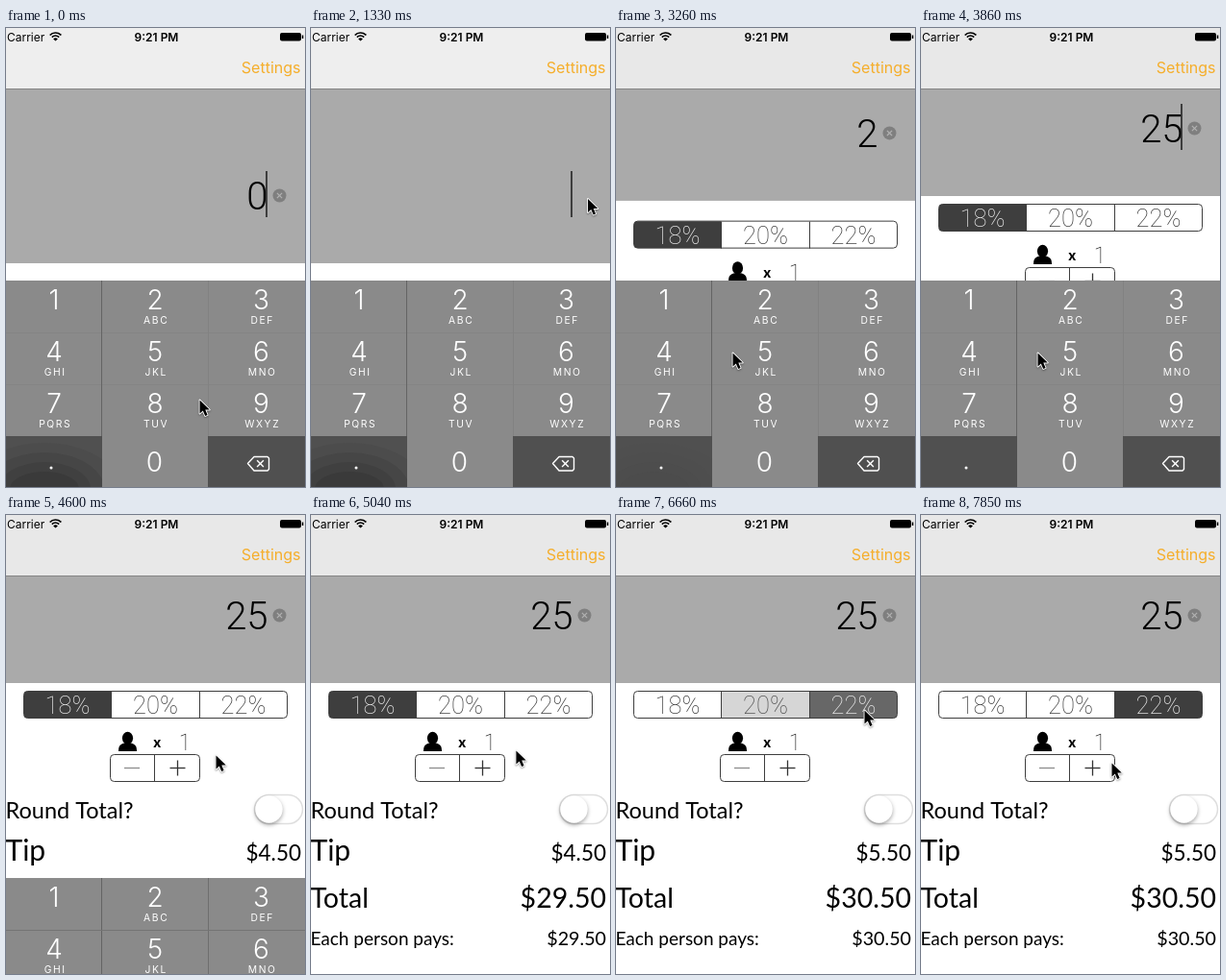
An HTML page with a canvas for the animation above (8000 ms loop, 311 by 478 pixels).

```html
<!DOCTYPE html>
<html lang="en">
<head>
<meta charset="utf-8">
<title>Tip calculator</title>
<style>
html, body { margin: 0; width: 100%; height: 100%; overflow: hidden; background: #fff; }
canvas { display: block; width: 311px; height: 478px; }
</style>
</head>
<body>
<canvas id="stage"></canvas>
<script>
const W = 311, H = 478, LOOP = 8000, FIRST = 450, STEP = 148;
const UI = 'Inter, sans-serif', THIN = 'Roboto, sans-serif', BODY = 'Lato, sans-serif';
const canvas = document.getElementById('stage');
const c = canvas.getContext('2d');
const dpr = window.devicePixelRatio || 1;
canvas.width = W * dpr;
canvas.height = H * dpr;

// Keys are [time, value...]
const CURSOR = [
  [0, 201, 387], [302, 201, 387], [1190, 289, 178], [1486, 286, 177],
  [2374, 171, 298], [2670, 171, 298], [3262, 121, 338], [3854, 121, 338],
  [4446, 218, 250], [4890, 218, 250], [5630, 169, 202], [6070, 169, 202],
  [6516, 258, 203], [7552, 258, 203], [7700, 228, 231], [7850, 198, 258]
];
const LIFT = [[2522, 0], [2670, .157], [2818, .38], [2966, .61], [3114, .8], [3262, .93], [3410, 1]];
const DROP = [[4298, 0], [4446, .12], [4594, .535], [4742, .87], [4890, 1]];
const TAPS = [5640, 6540];
const CARET_OFF = [[890, 1330], [1920, 2360], [3100, 3550], [4290, LOOP]];
const BILLS = [[3704, '25'], [2522, '2'], [1338, ''], [0, '0']];
const RATES = ['18%', '20%', '22%'];
const SUMS = [['$4.50', '$29.50'], ['$5.00', '$30.00'], ['$5.50', '$30.50']];
const LETTERS = ['', 'ABC', 'DEF', 'GHI', 'JKL', 'MNO', 'PQRS', 'TUV', 'WXYZ'];
const COLS = [50, 155, 265.5];

const clamp = x => Math.max(0, Math.min(1, x));
const smooth = x => x * x * (3 - 2 * x);
const mix = (a, b, k) => a + (b - a) * k;
const grey = v => `rgb(${[v, v, v].map(Math.round)})`;

function at(keys, t, ease = x => x) {
  let i = 0;
  while (i < keys.length - 2 && t >= keys[i + 1][0]) i++;
  const [a, b] = [keys[i], keys[i + 1]];
  const k = ease(clamp((t - a[0]) / (b[0] - a[0])));
  return a.slice(1).map((v, j) => mix(v, b[j + 1], k));
}

function rect(x, y, w, h, fill) {
  c.fillStyle = fill;
  c.fillRect(x, y, w, h);
}

function text(s, x, y, font, fill = '#000', align = 'left') {
  c.font = font;
  c.fillStyle = fill;
  c.textAlign = align;
  c.fillText(s, x, y);
}

function path(points, close) {
  c.beginPath();
  points.forEach(([x, y]) => c.lineTo(x, y));
  if (close) c.closePath();
}

function line(x1, y1, x2, y2, color, width = 1) {
  path([[x1, y1], [x2, y2]]);
  c.strokeStyle = color;
  c.lineWidth = width;
  c.stroke();
}

function cross(x, y, r, color, width) {
  line(x - r, y - r, x + r, y + r, color, width);
  line(x - r, y + r, x + r, y - r, color, width);
}

function box(x, y, w, h, r) {
  c.beginPath();
  c.roundRect(x, y, w, h, r);
}

function disc(x, y, rx, ry, fill) {
  c.beginPath();
  c.ellipse(x, y, rx, ry, 0, 0, Math.PI * 2);
  c.fillStyle = fill;
  c.fill();
}

function header(lift) {
  rect(0, 0, W, 64, grey(mix(238, 232, lift)));
  rect(0, 63, W, 1, '#858585');
  text('Carrier', 1, 14, `400 12px ${UI}`);
  text('9:21 PM', 156.5, 14, `600 12px ${UI}`, '#000', 'center');
  c.strokeStyle = '#000';
  c.lineWidth = 1.7;
  for (const r of [8, 5]) {
    c.beginPath();
    c.arc(51.5, 13, r, -Math.PI * .76, -Math.PI * .24);
    c.stroke();
  }
  c.beginPath();
  c.moveTo(51.5, 13.6);
  c.arc(51.5, 13.6, 3.2, -Math.PI * .76, -Math.PI * .24);
  c.fillStyle = '#000';
  c.fill();
  box(285, 5, 22, 8.5, 2);
  c.fill();
  rect(307.8, 7.5, 1.5, 3.5, '#000');
  text('Settings', 306.5, 47, `400 16px ${UI}`, '#f5ae2b', 'right');
}

function bill(t, lift) {
  const up = 70 * lift;
  rect(0, 64, W, 181 - up, '#aaa');
  const value = BILLS.find(b => t >= b[0])[1];
  text(value, 272.5, 189 - up, `300 40px ${THIN}`, '#000', 'right');
  if (value) {
    disc(284.5, 174.5 - up, 7, 7, '#7f7f7f');
    cross(284.5, 174.5 - up, 2.6, '#b2b2b2', 1.2);
  }
  if (!CARET_OFF.some(([a, b]) => t >= a && t < b))
    line(271, 149 - up, 271, 197 - up, '#222', 1.6);
}

function rates(fades) {
  const on = [1 - fades[0], fades[0] - fades[1], fades[1]];
  const edges = [18.5, 109.5, 201.5, 292.5];
  c.save();
  box(18.5, 183.5, 274, 28, 4);
  c.clip();
  RATES.forEach((s, i) => {
    const x = edges[i], w = edges[i + 1] - x;
    rect(x, 183, w, 29, grey(mix(255, 62, on[i])));
    text(s, x + w / 2, 207, `200 25.5px ${THIN}`, grey(on[i] > .5 ? 240 : mix(50, 110, on[i] * 2)), 'center');
  });
  c.restore();
  box(18.5, 183.5, 274, 28, 4);
  c.strokeStyle = '#3e3e3e';
  c.lineWidth = 1;
  c.stroke();
  for (const x of edges.slice(1, 3)) line(x, 184, x, 212, '#3e3e3e');
}

function people() {
  disc(126.5, 232.3, 5.6, 6.6, '#000');
  c.beginPath();
  c.moveTo(117, 246);
  c.bezierCurveTo(117, 240, 119, 239, 123, 237.5);
  c.lineTo(130, 237.5);
  c.bezierCurveTo(134, 239, 136, 240, 136, 246);
  c.fill();
  text('x', 157.2, 242, `700 14.5px ${UI}`, '#000', 'center');
  text('1', 186, 245, `200 23px ${THIN}`, '#111', 'center');
  box(108.5, 249.5, 93, 28, 4);
  c.strokeStyle = '#3e3e3e';
  c.lineWidth = 1;
  c.stroke();
  line(154.5, 250, 154.5, 277, '#3e3e3e');
  line(123, 263.5, 139, 263.5, '#8c8c8c', 1.3);
  line(170.5, 263.5, 186.5, 263.5, '#333', 1.3);
  line(178.5, 255.5, 178.5, 271.5, '#333', 1.3);
}

function toggle() {
  box(258.5, 291.5, 50, 30, 15);
  c.fillStyle = '#fff';
  c.fill();
  c.strokeStyle = '#dedede';
  c.lineWidth = 1.5;
  c.stroke();
  c.save();
  c.shadowColor = 'rgba(0,0,0,.35)';
  c.shadowBlur = 4 * dpr;
  c.shadowOffsetY = 2 * dpr;
  disc(273.5, 306.5, 14.2, 14.2, '#fff');
  c.restore();
}

function totals(pick) {
  const [tip, total] = SUMS[pick];
  const rows = [
    ['Round Total?', 316, 23.5, '', 0],
    ['Tip', 360, 30, tip, 22.5],
    ['Total', 409, 28.5, total, 28.5],
    ['Each person pays:', 448, 19, total, 19.7]
  ];
  for (const [label, y, size, sum, sumSize] of rows) {
    text(label, -.5, y, `400 ${size}px ${BODY}`);
    text(sum, 307, y, `400 ${sumSize}px ${BODY}`, '#000', 'right');
  }
}

function keypad(lift, drop) {
  c.save();
  c.translate(0, 263 + 215 * drop);
  rect(0, 0, W, 215, '#8a8a8a');
  rect(0, 162, 100, 53, '#505050');
  rect(210, 162, 101, 53, '#505050');
  if (lift < 1) {
    c.save();
    c.globalAlpha = 1 - lift;
    c.beginPath();
    c.rect(0, 162, 100, 53);
    c.clip();
    [[78, 48, 76], [62, 38, 70], [48, 28, 64], [36, 18, 58]].forEach(([rx, ry, v]) => disc(40, 217, rx, ry, grey(v)));
    c.restore();
  }
  for (const y of [54, 108]) rect(0, y, W, 1, 'rgba(70,70,70,.09)');
  rect(99, 0, 1, 162, '#646464');
  rect(210, 0, 1, 162, drop ? '#6e6e6e' : '#828282');
  if (drop) rect(0, 54, W, 1, '#747474');

  LETTERS.forEach((s, i) => {
    const x = COLS[i % 3], y = 30 + 54 * Math.floor(i / 3);
    text(i + 1, x, y, `300 28px ${UI}`, '#fff', 'center');
    c.letterSpacing = '1.6px';
    text(s, x + 1.2, y + 15, `400 10.3px ${UI}`, '#fff', 'center');
    c.letterSpacing = '0px';
  });
  text('0', 154.5, 199, `300 28px ${UI}`, '#fff', 'center');
  disc(47, 195, 1.5, 1.5, '#fff');

  path([[251.5, 190.5], [258, 183.5], [272, 183.5], [273.5, 185], [273.5, 196.5], [272, 198], [258, 198]], true);
  c.strokeStyle = '#fff';
  c.lineWidth = 1.4;
  c.lineJoin = 'round';
  c.stroke();
  cross(264.5, 190.7, 3.4, '#fff', 1.4);
  c.restore();
}

function cursor([x, y]) {
  c.save();
  c.translate(x, y);
  path([[.5, .5], [.5, 14.5], [3.8, 11.5], [6.2, 17], [8.6, 16], [6.3, 10.6], [10.8, 10.6]], true);
  c.shadowColor = 'rgba(0,0,0,.4)';
  c.shadowBlur = 2 * dpr;
  c.shadowOffsetY = dpr;
  c.strokeStyle = '#fff';
  c.lineWidth = 1.8;
  c.lineJoin = 'round';
  c.stroke();
  c.shadowColor = 'transparent';
  c.fillStyle = '#000';
  c.fill();
  c.restore();
}

function draw(time) {
  // The picture advances in even hard steps after an opening hold.
  const k = Math.floor((time - FIRST + 12) / STEP);
  const t = k < 0 ? 0 : FIRST + k * STEP;
  const [lift] = at(LIFT, t), [drop] = at(DROP, t);
  const fades = TAPS.map(tap => clamp((t - tap) / 160));

  c.setTransform(dpr, 0, 0, dpr, 0, 0);
  rect(0, 0, W, H, '#fff');
  header(lift);
  bill(t, lift);
  c.save();
  c.translate(0, 252 * (1 - lift));
  rates(fades);
  people();
  toggle();
  totals(fades.filter(f => f > 0).length);
  c.restore();
  if (drop < 1) keypad(lift, drop);
  cursor(at(CURSOR, t, smooth));
}

const start = performance.now();
function frame() {
  draw((performance.now() - start) % LOOP);
  requestAnimationFrame(frame);
}
frame();
</script>
</body>
</html>
```
